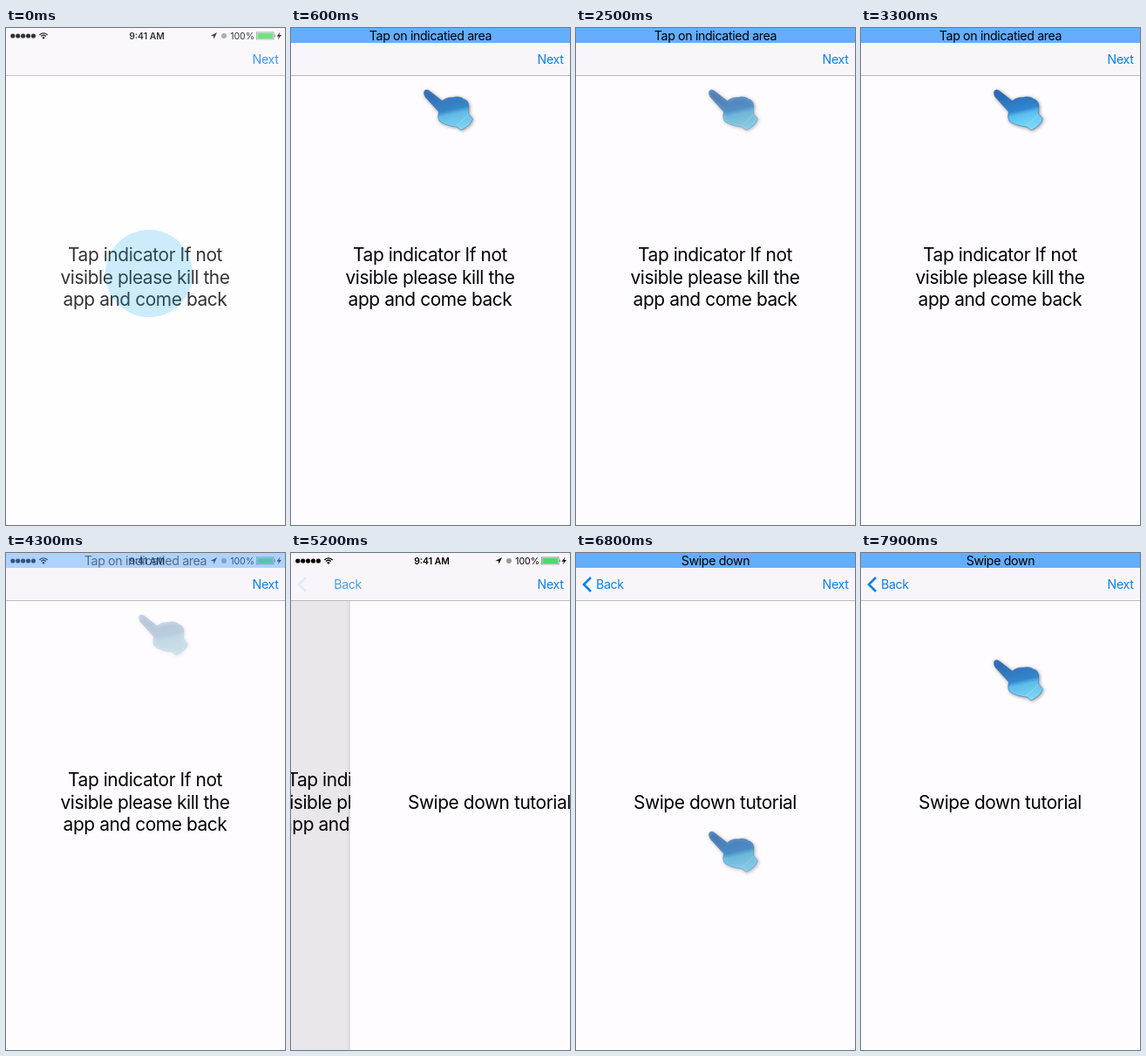
An HTML page with a canvas for the animation above (8000 ms loop, 320x569 px).

```html
<!DOCTYPE html>
<html lang="en">
<head>
<meta charset="utf-8">
<style>
  html, body { margin: 0; width: 100%; height: 100%; overflow: hidden; background: #fefcff; }
  canvas { display: block; width: 320px; height: 569px; }
</style>
</head>
<body>
<canvas id="stage"></canvas>
<script>
const W = 320, H = 569, LOOP = 8, TINT = '#0c7fe6', PAPER = '#fefcff';
const PUSH_AT = 5, GESTURE = 1.515;
const canvas = document.getElementById('stage');
const ctx = canvas.getContext('2d');
const dpr = window.devicePixelRatio || 1;
canvas.width = W * dpr;
canvas.height = H * dpr;

const clamp = v => Math.max(0, Math.min(1, v));
const ramp = (t, from, to) => clamp((t - from) / (to - from));

// Cubic bezier (0.42, 0, 0.58, 1), solved by bisection
function easeInOut(u) {
  let lo = 0, hi = 1;
  for (let i = 0; i < 20; i++) {
    const s = (lo + hi) / 2;
    const x = 1.26 * s * (1 - s) ** 2 + 1.74 * s * s * (1 - s) + s ** 3;
    if (x < u) lo = s; else hi = s;
  }
  return lo * lo * (3 - 2 * lo);
}

function withAlpha(alpha, draw) {
  if (alpha <= 0) return;
  ctx.save();
  ctx.globalAlpha *= alpha;
  draw();
  ctx.restore();
}

function rect(x, y, w, h, color) {
  ctx.fillStyle = color;
  ctx.fillRect(x, y, w, h);
}

function dot(x, y, r, color) {
  ctx.fillStyle = color;
  ctx.beginPath();
  ctx.arc(x, y, r, 0, 2 * Math.PI);
  ctx.fill();
}

function fillPath(d, color) {
  ctx.fillStyle = color;
  ctx.fill(new Path2D(d));
}

function text(str, x, y, size, { color = '#000', align = 'center', weight = 400, tracking = -0.025 } = {}) {
  ctx.font = `${weight} ${size}px Inter, "Liberation Sans", sans-serif`;
  ctx.letterSpacing = `${tracking * size}px`;
  ctx.textAlign = align;
  ctx.fillStyle = color;
  ctx.fillText(str, x, y);
}

function page(x, lines, firstBaseline) {
  rect(x, 55, W, H - 55, PAPER);
  lines.forEach((line, i) => text(line, x + 159.5, firstBaseline + i * 25.5, 20.9, { tracking: -0.02 }));
}

function statusBar() {
  for (let i = 0; i < 5; i++) dot(7.8 + i * 5.9, 9, 2.6, '#000');
  ctx.strokeStyle = '#000';
  ctx.lineWidth = 1.4;
  for (const r of [3.7, 6.1]) {
    ctx.beginPath();
    ctx.arc(43, 12, r, -Math.PI * 0.77, -Math.PI * 0.23);
    ctx.stroke();
  }
  dot(43, 11.3, 1.3, '#000');
  text('9:41 AM', 161.5, 12.7, 10.4, { weight: 600, tracking: 0 });
  fillPath('M234.5 9 L242 5 L238.4 12.8 L238 9.2 Z', '#111');
  dot(250, 9, 3, '#999');
  text('100%', 285, 12.7, 10.5, { align: 'right', tracking: 0 });
  ctx.strokeStyle = '#777';
  ctx.lineWidth = 0.7;
  ctx.strokeRect(287.5, 4.9, 19.5, 8);
  rect(288.4, 5.7, 17.7, 6.4, '#4cd964');
  rect(307.6, 7.4, 1.1, 3, '#777');
  fillPath('M314.4 4.5 L310.5 9.7 H313 L311.8 13.3 L316 7.9 H313.4 Z', '#111');
}

function navBar(rest, hasBack) {
  rect(0, 0, W, 54, '#f8f6fa');
  rect(0, 54, W, 1, '#bab8bc');
  text('Next', 312.5, 41, 14.2, { color: TINT, align: 'right' });
  if (!hasBack) return;
  withAlpha(1 - 1.2 * rest, () =>
    text('Back', 23 + 124 * rest, 41, 14.2, { color: TINT, align: 'left' }));
  withAlpha(1 - 4.3 * rest, () => {
    ctx.strokeStyle = TINT;
    ctx.lineWidth = 2.6;
    ctx.stroke(new Path2D('M17 28 L9 36 L17 44'));
  });
}

function banner(label, alpha) {
  withAlpha(alpha, () => {
    rect(0, 0, W, 17, '#64adff');
    text(label, 160, 13.6, 14.2);
  });
}

const HAND = new Path2D('M0.5 3 Q2 -0.5 6 1.5 L21.5 13.5 C25 10 30 9 34 9.5 C38 8 44 9 46 11.5 ' +
  'C50 12 52 16 52 20 L51.5 28 L56.5 34 Q54 42 43 47 L38 43 C32 43 22 40 18 36.5 Q15.5 32 17.5 26 L2 9 Q0 6 0.5 3 Z');

function hand(y, alpha) {
  withAlpha(alpha, () => {
    ctx.translate(152, y);
    const skin = ctx.createLinearGradient(24, 4, 34, 48);
    skin.addColorStop(0, '#2a6cb8');
    skin.addColorStop(0.46, '#2f86d0');
    skin.addColorStop(0.58, '#5abfee');
    skin.addColorStop(1, '#80dcfb');
    ctx.save();
    ctx.shadowColor = 'rgba(0,0,0,.5)';
    ctx.shadowBlur = 4 * dpr;
    ctx.shadowOffsetX = ctx.shadowOffsetY = dpr;
    ctx.fillStyle = skin;
    ctx.fill(HAND);
    ctx.restore();
    ctx.lineWidth = 0.7;
    ctx.strokeStyle = 'rgba(30,85,150,.55)';
    ctx.stroke(HAND);
    ctx.strokeStyle = 'rgba(255,255,255,.4)';
    ctx.stroke(new Path2D('M37 42 Q45 37 51.5 28.5'));
  });
}

// A repeating gesture, travelling down by `distance` while it fades
function gesture(elapsed, distance, alpha = 1) {
  if (elapsed < 0) return;
  const u = elapsed / GESTURE % 1;
  hand(70 + distance * easeInOut(u), alpha * (1 - u * u));
}

// Critically damped spring from 1 to 0
function pushRest(t) {
  const k = 14.5 * Math.max(0, t - PUSH_AT);
  return (1 + k) * Math.exp(-k);
}

function splash(alpha) {
  withAlpha(alpha, () => {
    rect(0, 0, W, H, PAPER);
    dot(164, 281, 50, '#05a5f0');
  });
}

function draw(t) {
  ctx.setTransform(dpr, 0, 0, dpr, 0, 0);
  ctx.clearRect(0, 0, W, H);
  const rest = pushRest(t), pushing = t > PUSH_AT;

  if (rest > 0.001) {
    page(-96 * (1 - rest), ['Tap indicator If not', 'visible please kill the', 'app and come back'], 267);
    rect(0, 55, W, H - 55, `rgba(0,0,0,${0.105 * (1 - rest)})`);
  }
  if (pushing) {
    const x = W * rest;
    const shade = ctx.createLinearGradient(x - 5, 0, x, 0);
    shade.addColorStop(0, 'rgba(0,0,0,0)');
    shade.addColorStop(1, `rgba(0,0,0,${0.06 * clamp(rest * 8)})`);
    rect(x - 5, 55, 5, H - 55, shade);
    page(x, ['Swipe down tutorial'], 292.5);
  }

  navBar(rest, pushing);
  statusBar();

  if (pushing) {
    gesture(t - 6.045, 498);
    banner('Swipe down', ramp(t, 6.15, 6.45));
  } else {
    const leaving = 1 - ramp(t, 4.15, 4.45);
    gesture(t - 0.15, 0, leaving);
    banner('Tap on indicatied area', ramp(t, 0.25, 0.55) * leaving);
  }
  splash(0.2 * (1 - ramp(t, 0, 0.15)));
}

const start = performance.now();
function tick() {
  draw((performance.now() - start) / 1000 % LOOP);
  requestAnimationFrame(tick);
}
tick();
</script>
</body>
</html>
```
